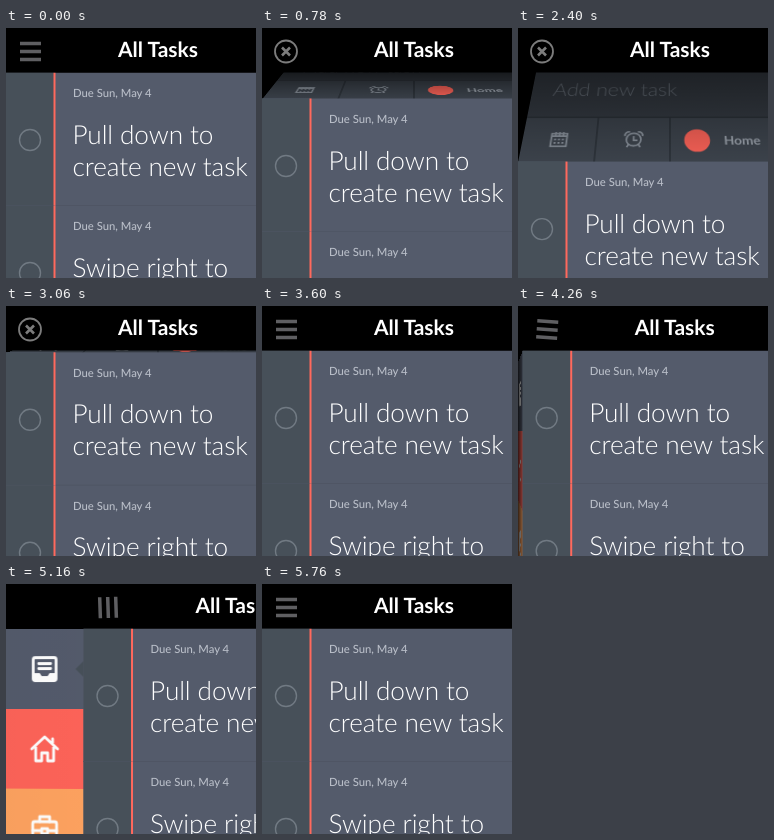
Animation of 250 by 250 pixels, one loop 5.82 s. Source, as an HTML page:

```html
<!DOCTYPE html>
<html lang="en">
<head>
<meta charset="utf-8">
<title>All Tasks</title>
<style>
  html, body { margin: 0; width: 100%; height: 100%; overflow: hidden; background: #000; }
  #stage { position: relative; width: 250px; height: 250px; overflow: hidden; background: #000; }
  #app { position: absolute; inset: 0; }
  svg { position: absolute; left: 0; top: 0; overflow: visible; display: block; }
  text { font-family: Lato, "Open Sans", sans-serif; text-rendering: geometricPrecision; }

  .hinge { position: absolute; perspective: 475px; }
  #fold { left: 0; top: -78.5px; width: 304px; height: 123.5px; perspective-origin: 152px 63.5px; }
  #side { left: -78px; top: 45px; width: 78px; height: 240px; perspective-origin: 78px 80px; }
  .leaf { position: absolute; inset: 0; }
  #fold .leaf { transform-origin: 50% 100%; }
  #side .leaf { transform-origin: 100% 50%; }
  .shade { position: absolute; inset: 0; }
  #fold .shade { background: linear-gradient(rgba(0,0,0,.85), rgba(0,0,0,.08)); }
  #side .shade { background: linear-gradient(to right, rgba(0,0,0,.8), rgba(0,0,0,.45)); }

  .due { font-size: 11.3px; font-weight: 500; fill: #b9bec8; }
  .task { font-size: 26.2px; font-weight: 300; letter-spacing: -.1px; fill: #fff; }
  .line { fill: none; stroke: #8b939d; stroke-width: 1.8; }
  .white { fill: none; stroke: #fff; stroke-width: 2.8; stroke-linejoin: round; stroke-linecap: round; }
</style>
</head>
<body>
<div id="stage">
  <div id="app">
    <div id="side" class="hinge">
      <div class="leaf">
        <svg width="78" height="240">
          <rect width="78" height="80" fill="#545b6c"/>
          <rect y="80" width="78" height="80" fill="#ff6459"/>
          <rect y="160" width="78" height="80" fill="#ffa360"/>
          <path d="M78 32L70 40L78 48Z" fill="#475059"/>
          <!-- inbox -->
          <g transform="translate(39 40)">
            <rect class="white" x="-11.5" y="-11.5" width="23" height="23" rx="2"/>
            <path class="white" d="M-6 -5.5H6M-6 -.5H6"/>
            <path d="M-11 4H-5L-3 7H3L5 4H11V11H-11Z" fill="#fff"/>
          </g>
          <!-- house -->
          <path class="white" transform="translate(39 120)"
            d="M-13 0L0 -12L13 0M-9 -2V12H-3V4H3V12H9V-2M8 -10V-6"/>
          <!-- briefcase -->
          <g class="white" transform="translate(39 200)">
            <rect x="-12" y="-7" width="24" height="19" rx="2"/>
            <path d="M-5 -7V-12H5V-7M-12 2H-3M3 2H12"/>
            <rect x="-3" y="0" width="6" height="5"/>
          </g>
        </svg>
        <div class="shade"></div>
      </div>
    </div>

    <div id="fold" class="hinge">
      <div class="leaf">
        <svg width="304" height="123.5">
          <rect width="304" height="70" fill="#363c44"/>
          <rect y="70" width="304" height="53.5" fill="#3e454e"/>
          <path d="M0 70H304M76 70V123.5M152 70V123.5" stroke="#292e35" stroke-width="1.3"/>
          <text x="23" y="42" font-size="23.5" font-weight="300" fill="#6b737d">Add new task</text>
          <!-- calendar -->
          <g class="line" transform="translate(37.5 97)">
            <rect x="-8" y="-7" width="16" height="15"/>
            <path d="M-8 -4H8M-4 -9V-5M0 -9V-5M4 -9V-5"/>
            <path d="M-5 0H6M-5 4H6" stroke-dasharray="2 2"/>
          </g>
          <!-- alarm -->
          <g class="line" transform="translate(114.5 97)">
            <circle r="7.5"/>
            <path d="M0 -4V1H4M-5 6L-7 9M5 6L7 9M-9 -4A4 4 0 0 1 -4 -9M9 -4A4 4 0 0 0 4 -9"/>
          </g>
          <circle cx="180" cy="98" r="13.3" fill="#ff6459"/>
          <text x="207.5" y="103" font-size="14" font-weight="700" fill="#9da4ae">Home</text>
        </svg>
        <div class="shade"></div>
      </div>
    </div>

    <svg id="list" width="304" height="250"></svg>

    <svg id="bar" width="304" height="45">
      <rect x="-80" width="400" height="44.5" fill="#000"/>
      <path id="menu" d="M14 15.5H35M14 23.5H35M14 31.5H35" stroke="#5f5f62" stroke-width="3.5"/>
      <g id="close" fill="none" stroke="#7c7c7c" stroke-width="1.8">
        <circle cx="24" cy="23.5" r="11"/>
        <path d="M20 19.5L28 27.5M28 19.5L20 27.5" stroke-width="2.6"/>
      </g>
      <text x="152" y="29" font-size="21" font-weight="700" fill="#fff" text-anchor="middle">All Tasks</text>
    </svg>
  </div>
</div>

<script>
const $ = q => document.querySelector(q);
const LOOP = 5820, STEP = 60, DEPTH = 475;
const FOLD = 123.5, SIDE = 78;

const row = (y, lines) => `
  <g transform="translate(0 ${y})">
    <rect y="-.5" width="320" height="133.5" fill="#545b6b"/>
    <rect y="-.5" width="48" height="133.5" fill="#475059"/>
    <path d="M0 132.5H320" stroke="#4a515f"/>
    <rect x="47.5" y="-.5" width="2" height="133.5" fill="#ff695d"/>
    <circle cx="24" cy="67" r="10.5" fill="none" stroke="#717a83" stroke-width="1.4"/>
    <text class="due" x="67" y="24">Due Sun, May 4</text>
    ${lines.map((s, i) => `<text class="task" x="66.5" y="${70.5 + 32 * i}">${s}</text>`).join("")}
  </g>`;
$("#list").innerHTML =
  row(45, ["Pull down to", "create new task"]) +
  row(178, ["Swipe right to", "complete"]);

const clamp = x => Math.min(1, Math.max(0, x));
const ramp = (t, a, b) => clamp((t - a) / (b - a));
const ease = x => (1 - Math.cos(Math.PI * x)) / 2;
// Rises over a..b, falls over c..d
const swing = (t, a, b, c, d) => ease(ramp(t, a, b)) - ease(ramp(t, c, d));
// Visible size of a leaf turned back by the given angle
const reach = (size, a) => size * Math.cos(a) / (1 + size * Math.sin(a) / DEPTH);

function turn(id, axis, sign, a) {
  $(id + " .leaf").style.transform = `rotate${axis}(${sign * a}rad)`;
  $(id + " .shade").style.opacity = Math.sin(a);
  $(id).style.visibility = a > 1.57 ? "hidden" : "visible";
}

function draw(t) {
  const open = swing(t, 480, 1590, 1850, 3150);
  const a = (1 - open) * Math.PI / 2;
  const drop = reach(FOLD, a);
  turn("#fold", "X", 1, a);
  $("#fold").style.transform = $("#list").style.transform = `translateY(${drop}px)`;

  const out = swing(t, 4165, 4865, 5100, 5740);
  const b = (1 - out) * Math.PI / 2;
  turn("#side", "Y", -1, b);
  $("#app").style.transform = `translateX(${reach(SIDE, b)}px)`;

  const cross = ramp(t, 540, 780) - ramp(t, 3060, 3300);
  $("#close").style.opacity = cross;
  $("#menu").style.opacity = 1 - cross;
  $("#menu").setAttribute("transform", `rotate(${90 * out} 24.5 23.5)`);
}

const start = performance.now();
function tick() {
  const t = (performance.now() - start) % LOOP;
  draw(Math.floor(t / STEP) * STEP);
  requestAnimationFrame(tick);
}
tick();
</script>
</body>
</html>
```
